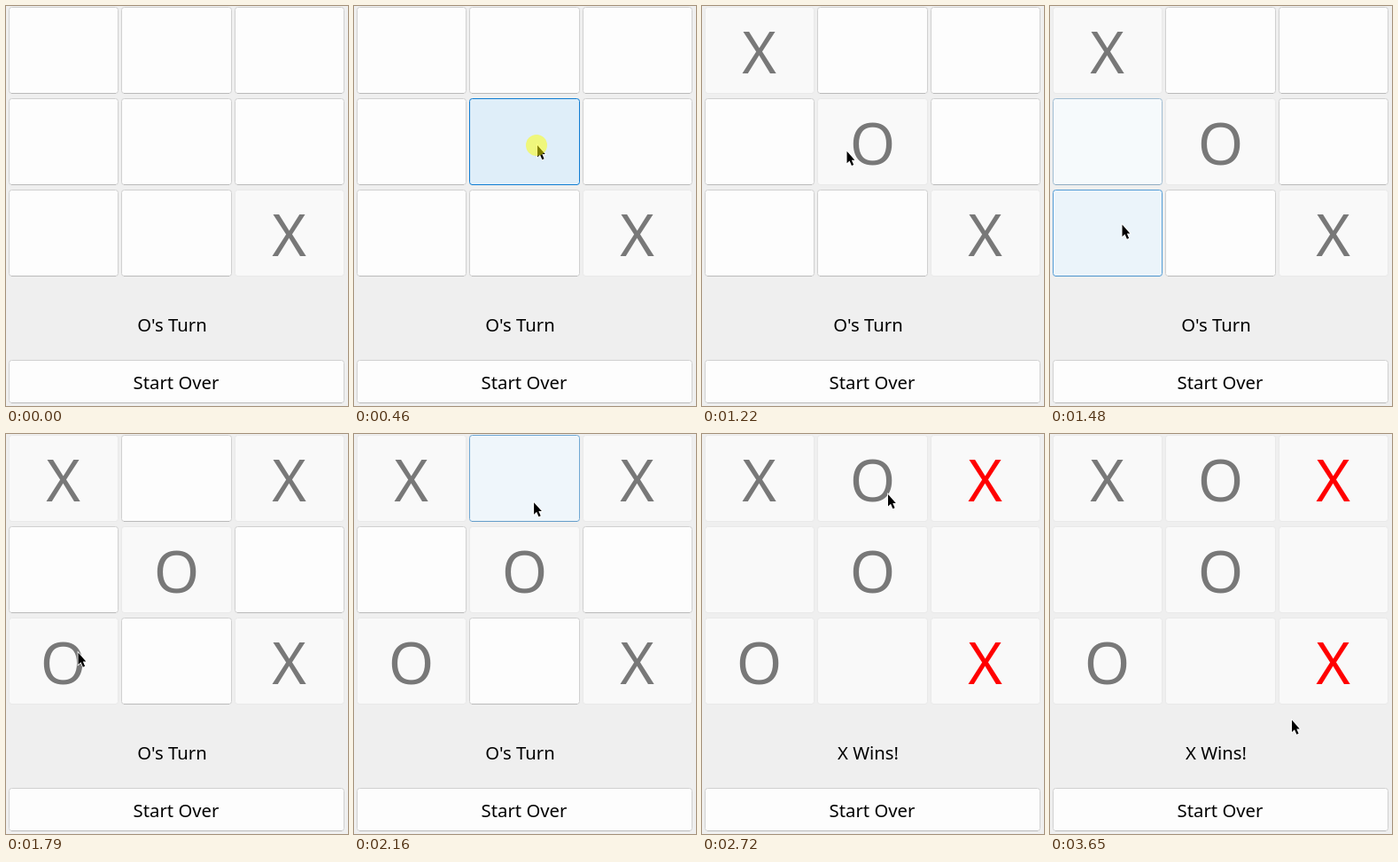
An HTML page with a canvas for the animation above (3680 ms loop, 386 px wide and 451 px high).

```html
<!DOCTYPE html>
<html lang="en">
<head>
<meta charset="utf-8">
<title>Tic-tac-toe</title>
<style>
html, body { margin: 0; width: 100%; height: 100%; overflow: hidden; background: #efefef; }
canvas { display: block; width: 386px; height: 451px; }
</style>
</head>
<body>
<canvas id="board"></canvas>
<script>
const LOOP = 3680, W = 386, H = 451, FADE = 200;
const FONT = '"Noto Sans", "Open Sans", sans-serif';
const canvas = document.getElementById('board');
const ctx = canvas.getContext('2d');
const dpr = window.devicePixelRatio || 1;
canvas.width = W * dpr;
canvas.height = H * dpr;

// Bursts of activity: start, end, number of steps
const BURSTS = [
  [90, 580, 13], [710, 790, 2], [1140, 1620, 13],
  [1720, 2240, 14], [2290, 2720, 10], [3520, 3650, 4]
];

const COLS = [[3, 124], [130, 125], [258, 124]];
const ROWS = [1, 104, 207];
const CELLS = Array.from({ length: 9 }, (_, i) => {
  const [x, w] = COLS[i % 3];
  return { x, y: ROWS[Math.floor(i / 3)], w, h: 98 };
});
const CENTERS = [64.5, 192.5, 319.7];

const CLICKS = [
  { cell: 4, down: 440, up: 545, dim: 710, off: 790 },
  { cell: 6, down: 1490, up: 1575, dim: 1720, off: 1760 },
  { cell: 1, down: 2420, up: 2545, dim: 2640, off: 2720 }
];
const WIN = CLICKS[2].up;

// Cell index -> [mark, time it is placed]
const MARKS = {
  8: ['X', 0], 4: ['O', CLICKS[0].up], 0: ['X', CLICKS[0].up],
  6: ['O', CLICKS[1].up], 2: ['X', CLICKS[1].up], 1: ['O', WIN]
};

const easeOut = s => 1 - (1 - s) ** 3;
const smooth = s => s * s * (3 - 2 * s);
const MOVES = [
  { t0: 90, t1: 400, a: [324, 449], c: [265.5, 303], b: [207, 157], ease: easeOut },
  { t0: 1120, t1: 1455, a: [207, 157], c: [95, 165], b: [81.5, 246.5], ease: smooth },
  { t0: 1820, t1: 2230, a: [81.5, 246.5], c: [140, 160], b: [207, 72], ease: s => 1 - (1 - s) ** 2 },
  { t0: 2270, t1: 2380, a: [207, 72], c: [209, 70], b: [210, 68], ease: smooth },
  { t0: 3490, t1: 3650, a: [210, 68], c: [238, 180], b: [273, 322.5], ease: s => s ** 1.3 }
];

const clamp = v => Math.max(0, Math.min(1, v));
const mix = (a, b, k) => a.map((v, i) => v + (b[i] - v) * k);
const rgb = c => `rgb(${c.map(Math.round).join(',')})`;

const NORMAL = { fill: [253, 253, 253], edge: [208, 208, 208], base: [186, 186, 186] };
const HOVER = { fill: [225, 239, 249], edge: [16, 128, 215], base: [16, 128, 215] };
const PRESSED = { fill: [204, 228, 247], edge: [0, 84, 153], base: [0, 84, 153] };
const DISABLED = { fill: [249, 249, 249], edge: [233, 233, 233], base: [233, 233, 233] };
const blend = (a, b, k) => ({
  fill: mix(a.fill, b.fill, k), edge: mix(a.edge, b.edge, k), base: mix(a.base, b.base, k)
});

function snap(t) {
  let s = 0;
  for (const [a, b, n] of BURSTS) {
    if (t < a) break;
    const d = (b - a) / (n - 1);
    s = a + Math.min(n - 1, Math.floor((t - a) / d + 1e-6)) * d;
  }
  return s;
}

function pointer(t) {
  if (t < MOVES[0].t0) return null;
  let m = MOVES[0];
  for (const n of MOVES) if (t >= n.t0) m = n;
  const s = m.ease(clamp((t - m.t0) / (m.t1 - m.t0))), r = 1 - s;
  return m.a.map((v, i) => r * r * v + 2 * r * s * m.c[i] + s * s * m.b[i]);
}

function inside(cell, p) {
  return p && p[0] >= cell.x && p[0] < cell.x + cell.w && p[1] >= cell.y && p[1] < cell.y + cell.h;
}

// Share of the last FADE ms the pointer spent over the cell
function hover(cell, t) {
  let n = 0;
  for (let d = 0; d < FADE; d += 10) if (inside(cell, pointer(t - d))) n++;
  return n * 10 / FADE;
}

function cellStyle(i, t) {
  const click = CLICKS.find(c => c.cell === i);
  const placed = MARKS[i] ? MARKS[i][1] : WIN;
  const live = at => {
    const s = blend(NORMAL, HOVER, hover(CELLS[i], at));
    return click && at >= click.down ? blend(s, PRESSED, clamp((at - click.down) / FADE)) : s;
  };
  if (t < Math.min(placed, WIN)) return live(t);
  return click ? blend(live(click.up), DISABLED, clamp((t - click.up) / 130)) : DISABLED;
}

function button({ x, y, w, h }, style) {
  ctx.beginPath();
  ctx.roundRect(x + 0.5, y + 0.5, w - 1, h - 1, 3);
  ctx.fillStyle = rgb(style.fill);
  ctx.fill();
  ctx.lineWidth = 1;
  ctx.strokeStyle = rgb(style.edge);
  ctx.stroke();
  ctx.fillStyle = rgb(style.base);
  ctx.fillRect(x + 3, y + h - 1, w - 6, 1);
}

function text(str, x, y, size, color) {
  ctx.font = `${size}px ${FONT}`;
  ctx.fillStyle = color;
  ctx.fillText(str, x, y);
}

function drawPointer([x, y]) {
  const path = new Path2D('M0 0V13.5L3 10.7L5.4 16.2L7.6 15.2L5.3 9.9H8.8Z');
  ctx.save();
  ctx.translate(x, y);
  ctx.lineWidth = 1.6;
  ctx.strokeStyle = '#fff';
  ctx.stroke(path);
  ctx.fillStyle = '#000';
  ctx.fill(path);
  ctx.restore();
}

function draw(t) {
  ctx.setTransform(dpr, 0, 0, dpr, 0, 0);
  ctx.fillStyle = '#efefef';
  ctx.fillRect(0, 0, W, H);
  ctx.textAlign = 'center';

  CELLS.forEach((cell, i) => {
    button(cell, cellStyle(i, t));
    const mark = MARKS[i];
    if (mark && t >= mark[1]) {
      const won = t >= WIN && i % 3 === 2;
      text(mark[0], CENTERS[i % 3], cell.y + 75, 66, won ? '#f00' : '#787878');
    }
  });

  text(t < WIN ? "O's Turn" : 'X Wins!', 187.5, 367, 20.3, '#000');
  button({ x: 3, y: 399, w: 379, h: 49 }, NORMAL);
  text('Start Over', 192, 432, 20.3, '#000');

  const p = pointer(t);
  if (!p) return;
  drawPointer(p);
  const click = CLICKS.find(c => t >= c.down && t < c.off);
  if (click) {
    ctx.fillStyle = `rgba(255,255,0,${t < click.dim ? 0.5 : 0.25})`;
    ctx.beginPath();
    ctx.arc(p[0] - 1, p[1], 12, 0, Math.PI * 2);
    ctx.fill();
  }
}

const start = performance.now();
function tick() {
  draw(snap((performance.now() - start) % LOOP));
  requestAnimationFrame(tick);
}
tick();
</script>
</body>
</html>
```
